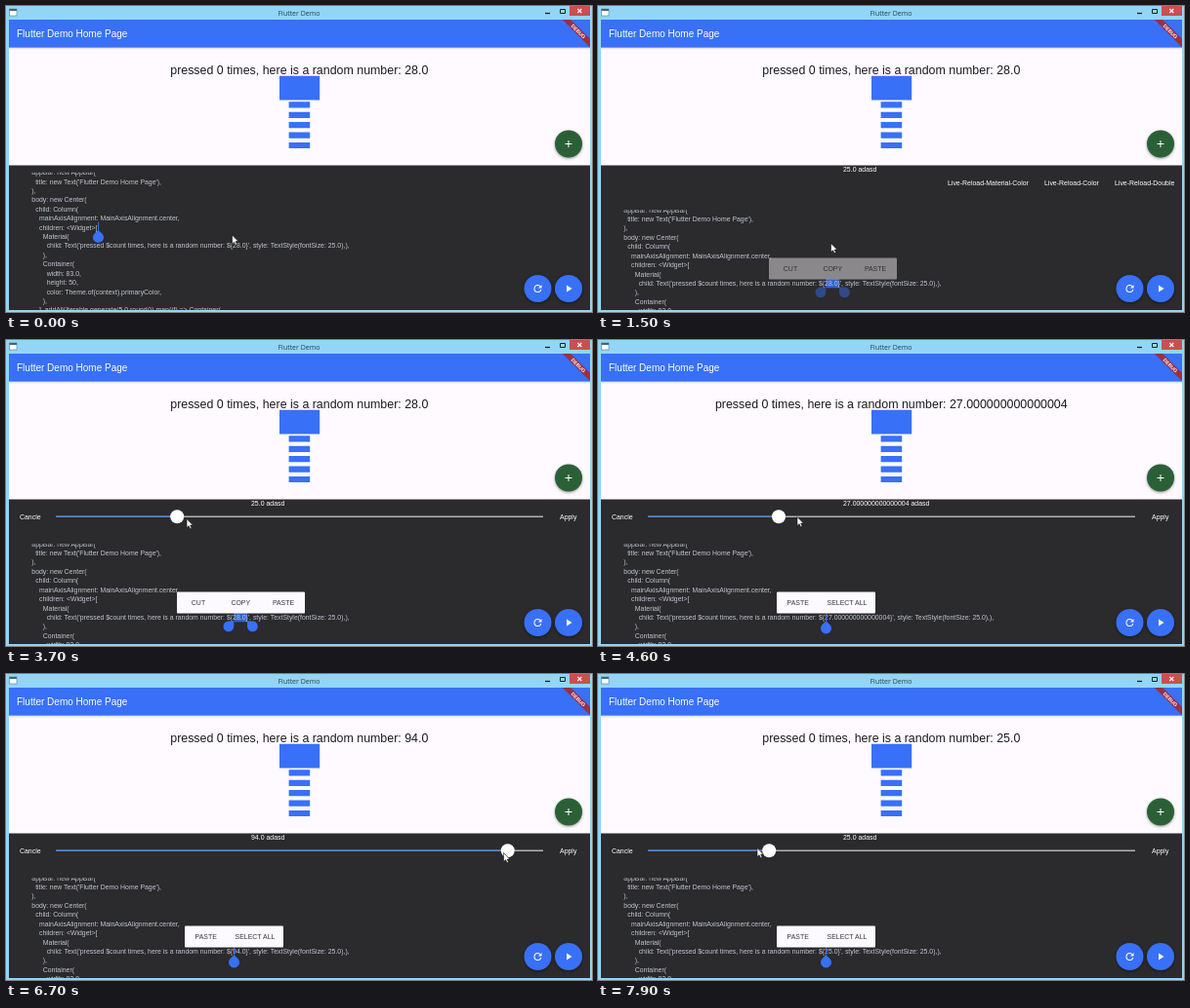
Animation of 600 by 314 pixels, one loop 8000 ms. Source, as an HTML page:

```html
<!DOCTYPE html>
<html lang="en">
<head>
<meta charset="utf-8">
<title>Flutter Demo</title>
<style>
  html, body { margin: 0; width: 100%; height: 100%; overflow: hidden; }
  svg { display: block; }
  text { font-family: "Liberation Sans", Arial, sans-serif; font-size: 6.95px; fill: #fff; }
  #code text { font-size: 6.9px; fill: #c0c6d4; }
  .menu text { fill: #3a393c; text-anchor: middle; }
  .fab { filter: drop-shadow(0 1.5px 1.5px #0006); }
</style>
</head>
<body>
<svg id="stage" width="600" height="314" viewBox="0 0 600 314">
  <!-- window frame -->
  <rect width="600" height="314" fill="#92d5f6"/>
  <rect x="3.5" y="3" width="7.5" height="7" fill="#fff" stroke="#6d8796" stroke-width=".7"/>
  <rect x="3.5" y="3" width="7.5" height="2" fill="#4a6372"/>
  <text x="300" y="10" text-anchor="middle" style="font:7px 'Open Sans',sans-serif;fill:#26414f">Flutter Demo</text>
  <path d="M552 7.5h5" stroke="#222" stroke-width="1.3"/>
  <path d="M567.5 3.5h5v4h-5z" fill="none" stroke="#222"/>
  <rect x="577" width="21" height="10" fill="#c9504f"/>
  <path d="M585.3 3l4 4m0-4l-4 4" stroke="#fff" stroke-width="1.1"/>

  <!-- app -->
  <rect x="3" y="14" width="595" height="150" fill="#fefaff"/>
  <rect x="3" y="42" width="595" height="1" fill="#b9c3dd"/>
  <rect x="3" y="43" width="595" height="1.5" fill="#e9e8f1"/>
  <rect x="3" y="14" width="595" height="28.5" fill="#3870f7"/>
  <text x="11" y="32" style="font-size:10px">Flutter Demo Home Page</text>
  <svg x="560" y="14" width="38" height="40">
    <g transform="translate(38 0) rotate(45)">
      <rect x="-24" y="14" width="48" height="6" fill="#9b2f45"/>
      <text y="18.8" text-anchor="middle" style="font-size:5.1px;font-weight:bold">DEBUG</text>
    </g>
  </svg>
  <text id="headline" x="300.3" y="69.6" text-anchor="middle" style="font-size:12.42px;fill:#1c1b1e"/>
  <path id="bars" d="M280 71.8h41.2v24.6h-41.2z" fill="#3870f7"/>

  <!-- editor panel -->
  <rect x="3" y="163.5" width="595" height="148.5" fill="#2b2a2c"/>
  <g id="panel"><text id="label" x="251" y="170.2"/></g>
  <g id="links">
    <text x="358" y="183.7">Live-Reload-Material-Color</text>
    <text x="457" y="183.7">Live-Reload-Color</text>
    <text x="529" y="183.7">Live-Reload-Double</text>
  </g>
  <g id="slider">
    <text x="14" y="183.7">Cancle</text>
    <text x="567" y="183.7">Apply</text>
    <path d="M51 181.2H550" stroke="#f4f4f4"/>
    <path id="active" stroke="#2f77d6" stroke-width="1.3"/>
    <circle id="thumb" cy="181.2" r="7" fill="#fff"/>
  </g>
  <rect id="highlight" x="233.3" y="280" width="14" height="9.3" fill="#3264c8"/>
  <svg id="code" width="600"></svg>
  <g id="caret" fill="#3870f7">
    <rect x="-.4" y="-16" width="1" height="9"/>
    <path d="M0-7.6L3.9-3.9A5.5 5.5 0 1 1-3.9-3.9z"/>
  </g>
  <g id="selection">
    <path d="M233.3 288.5v5.5a5.4 5.4 0 1 1-5.4-5.5zM247 288.5v5.5a5.4 5.4 0 1 0 5.4-5.5z" fill="#3870f7"/>
    <g class="menu">
      <rect x="175" y="258.5" width="131" height="22" rx="1" fill="#fdfaff"/>
      <text x="197" y="272">CUT</text><text x="240.3" y="272">COPY</text><text x="284" y="272">PASTE</text>
    </g>
  </g>
  <g id="pasteMenu" class="menu">
    <rect x="183" y="258.5" width="101" height="22" rx="1" fill="#fdfaff"/>
    <text x="204.7" y="272">PASTE</text><text x="255" y="272">SELECT ALL</text>
  </g>
  <g id="fabs"></g>
  <path id="mouse" d="M0 0V9L2.1 7.2 3.5 10.2 5 9.5 3.7 6.6H6.4z" fill="#fff" stroke="#111" stroke-width=".6"/>
</svg>
<script>
const $ = id => document.getElementById(id);
const show = (id, visible) => $(id).style.display = visible ? "" : "none";
const add = (id, markup) => $(id).insertAdjacentHTML("beforeend", markup);

const LOOP = 8000, STEP = 100, SELECT = 1500, SLIDE = 2900, DRAG = 4400;
const LINE = 9.42, INDENT = 3.84;

// [time, x, y] of the pointer and [time, value] of the slider
const pointerKeys = [
  [0, 231.5, 235], [100, 231.5, 235], [800, 238, 243], [1200, 238.5, 243.5], [1900, 238.5, 243.5],
  [2200, 350, 220], [2600, 556, 181], [2800, 556, 181], [3100, 450, 180], [3500, 210, 183],
  [3700, 185, 183.5], [4200, 178, 181], [4300, 178, 181], [4600, 204, 181.5], [5400, 347, 185],
  [6100, 520, 184], [6400, 532, 184], [6700, 509.5, 183.5], [7300, 330, 181], [7900, 163, 178.5]];
const valueKeys = [
  [0, 25], [4300, 25], [4600, 27], [5400, 57], [6100, 92], [6400, 97], [6700, 94], [7300, 60], [7900, 25]];

function at(keys, t) {
  const i = keys.findIndex(k => k[0] > t);
  if (i < 0) return keys[keys.length - 1].slice(1);
  const a = keys[i - 1], b = keys[i], p = (t - a[0]) / (b[0] - a[0]);
  return a.slice(1).map((v, j) => v + (b[j + 1] - v) * p);
}

const source = `appBar: new AppBar(
  title: new Text('Flutter Demo Home Page'),
),
body: new Center(
  child: Column(
    mainAxisAlignment: MainAxisAlignment.center,
    children: <Widget>[
      Material(
        child: Text('pressed $count times, here is a random number: \${28.0}', style: TextStyle(fontSize: 25.0),),
      ),
      Container(
        width: 83.0,
        height: 50,
        color: Theme.of(context).primaryColor,
      ),
    ]..addAll(Iterable.generate(5.0.round()).map((f) => Container(`.split("\n");

const lines = source.map((line, i) => {
  const text = document.createElementNS("http://www.w3.org/2000/svg", "text");
  const code = line.trimStart();
  text.setAttribute("x", 26.3 + (line.length - code.length) * INDENT / 2);
  text.setAttribute("y", i * LINE + 2.3);
  text.textContent = code;
  $("code").append(text);
  return text;
});
const numberLine = lines[8], numberCode = numberLine.textContent;

let bars = $("bars").getAttribute("d");
for (let i = 0; i < 5; i++) bars += `M289.6 ${98.3 + i * 10.4}h21.6v6.2h-21.6z`;
$("bars").setAttribute("d", bars);

const fab = (x, y, color, icon) => add("fabs",
  `<circle class="fab" cx="${x}" cy="${y}" r="14" fill="${color}"/>
   <path transform="translate(${x - 6} ${y - 6}) scale(.5)" d="${icon}" fill="#fff"/>`);
fab(576, 141.5, "#2b6036", "M19 13h-6v6h-2v-6H5v-2h6V5h2v6h6z");
fab(544.5, 290, "#3870f7", "M17.65 6.35A7.95 7.95 0 0 0 12 4a8 8 0 1 0 7.73 10h-2.08A6 6 0 1 1 12 6c1.66 0 3.14.69 4.22 1.78L13 11h7V4z");
fab(576, 290, "#3870f7", "M8 5v14l11-7z");

function draw(t) {
  const selecting = t >= SELECT && t < DRAG, dragging = t >= DRAG;
  const value = Math.round(at(valueKeys, t)[0]);
  const number = value === 27 ? "27.000000000000004" : value.toFixed(1);
  const shown = dragging ? number : "28.0";
  const [x, y] = at(pointerKeys, t);

  $("headline").textContent = `pressed 0 times, here is a random number: ${shown}`;
  $("label").textContent = `${number} adasd`;
  numberLine.textContent = numberCode.replace("28.0", shown);

  const top = t < SELECT ? 170.8 : 209.3;
  $("code").setAttribute("y", top);
  $("code").setAttribute("height", 312 - top);

  show("panel", t >= SELECT);
  show("links", t >= SELECT && t < SLIDE);
  show("slider", t >= SLIDE);
  show("highlight", selecting);
  show("selection", selecting);
  show("pasteMenu", dragging);
  show("caret", !selecting);
  $("selection").style.opacity = Math.min(1, .45 + (t - SELECT) / 350);
  $("caret").setAttribute("transform", dragging ? "translate(233.5 296)" : "translate(94.5 237.5)");

  const thumbX = 175.2 + (value - 25) * 4.906;
  $("thumb").setAttribute("cx", thumbX);
  $("active").setAttribute("d", `M51 181.2H${thumbX}`);
  $("mouse").setAttribute("transform", `translate(${x} ${y})`);
}

const start = performance.now();
function frame() {
  const t = (performance.now() - start) % LOOP;
  draw(Math.floor(t / STEP) * STEP);
  requestAnimationFrame(frame);
}
frame();
</script>
</body>
</html>
```
